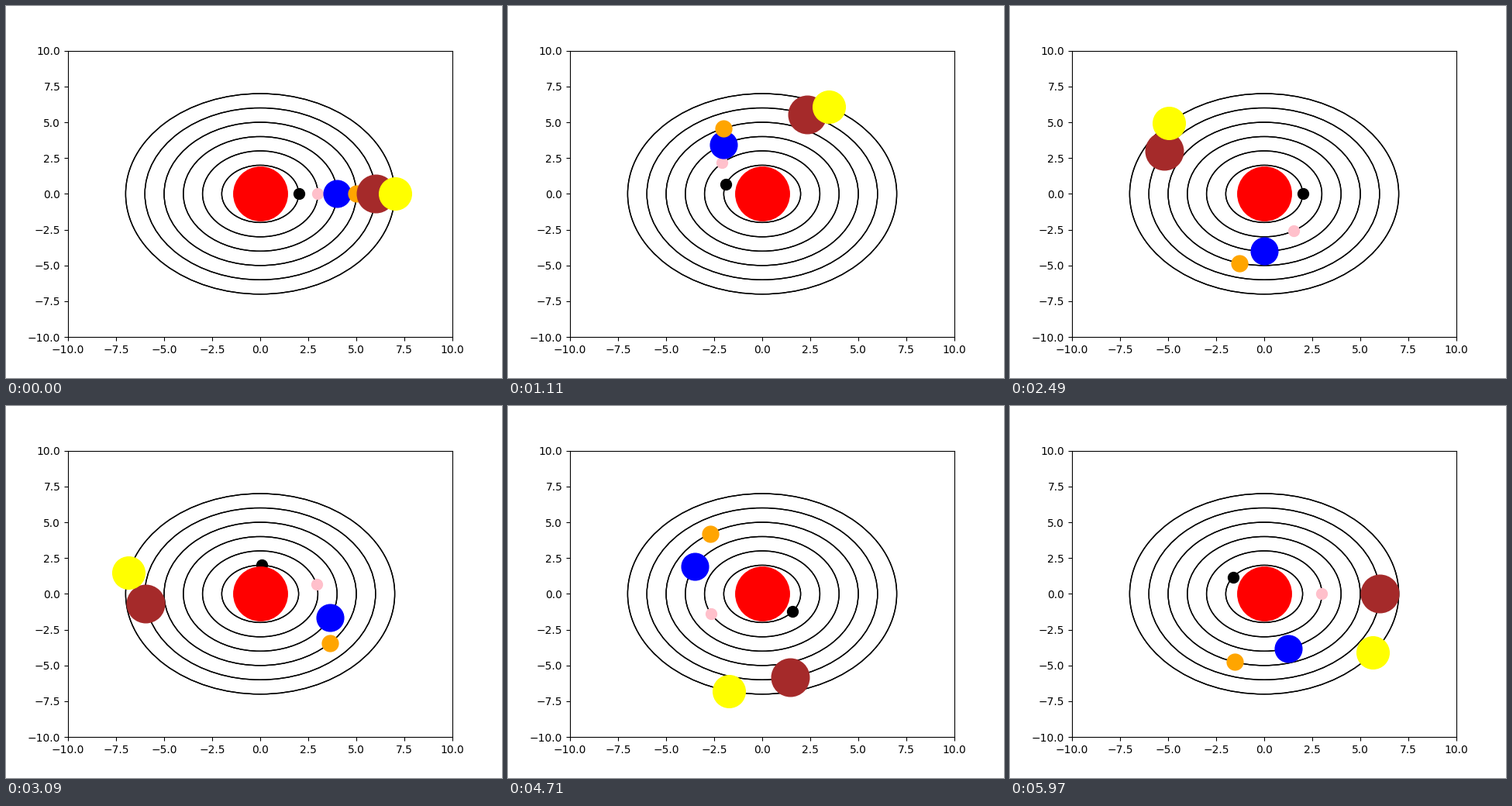
Animation, 640 px wide and 480 px high, one loop 6 s. Source, as a matplotlib script:

```python
import numpy as np
import matplotlib.pyplot as plt
from matplotlib.animation import FuncAnimation
from matplotlib.patches import Circle

FRAMES = 200
STEP = 2 * np.pi / (FRAMES - 1)
PASSES = 2  # repeated strokes darken the soft edges of the orbits

# orbit radius, angular speed, marker size, colour
PLANETS = [
    (2, 2.4, 10, "black"),
    (3, 2.0, 10, "pink"),
    (4, 1.8, 25, "blue"),
    (5, 1.7, 15, "orange"),
    (6, 1.0, 35, "brown"),
    (7, 0.9, 30, "yellow"),
]

fig, ax = plt.subplots(figsize=(6.4, 4.8), dpi=100)
ax.set_xlim(-10, 10)
ax.set_ylim(-10, 10)

for radius, *_ in PLANETS:
    for _ in range(PASSES):
        ax.add_patch(Circle((0, 0), radius, fill=False, ec="black", lw=1))

dots = [ax.plot([radius], [0], "o", ms=size, color=color)[0]
        for radius, _, size, color in PLANETS]
ax.plot([0], [0], "o", ms=50, color="red")


def update(i):
    for dot, (radius, speed, *_) in zip(dots, PLANETS):
        angle = speed * STEP * i
        dot.set_data([radius * np.cos(angle)], [radius * np.sin(angle)])
    return dots


anim = FuncAnimation(fig, update, frames=FRAMES, interval=30,
                     repeat=True, repeat_delay=0)
plt.show()
```
